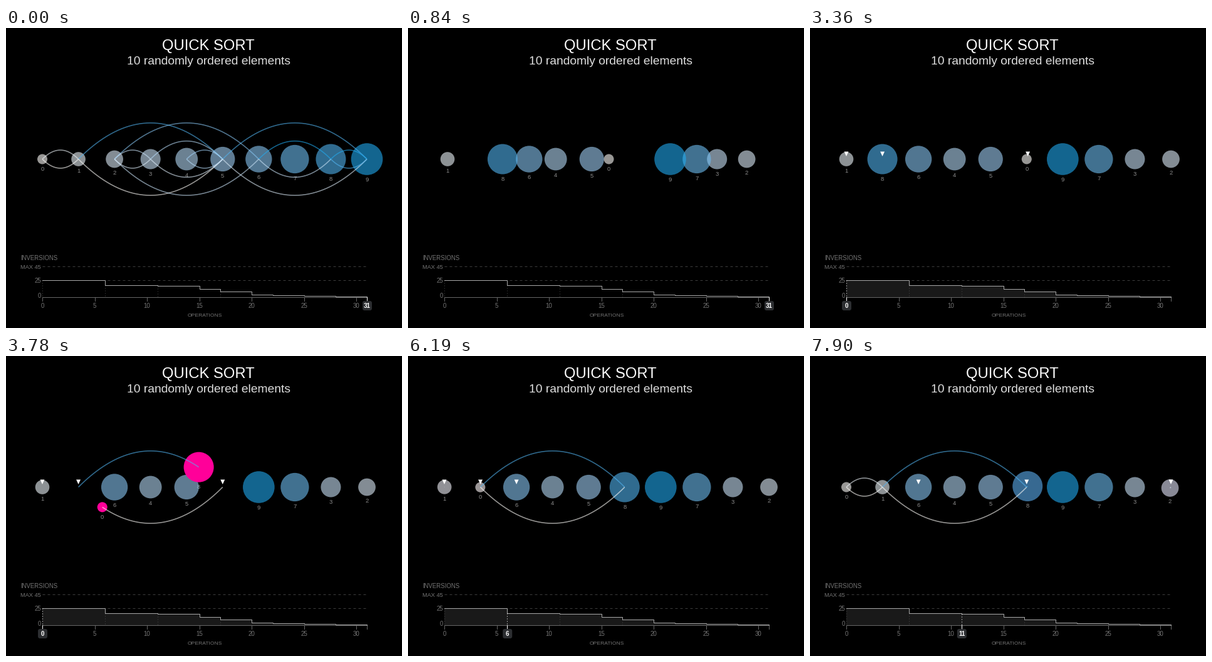
Animation, 632 px wide and 477 px high, one loop 8 s. Source, as a matplotlib script:

```python
import numpy as np
import matplotlib.pyplot as plt
from matplotlib.animation import FuncAnimation
from matplotlib.patches import Circle, FancyBboxPatch, Polygon

W, H, LOOP, TICK = 632, 477, 8000, 40
PX = 0.72                      # points per pixel at 100 dpi
X0, X1, MID = 58, 576, 208.5   # row of elements
BASE = 428.5                   # chart axis
SANS = "Liberation Sans"

START = [1, 8, 6, 4, 5, 0, 9, 7, 3, 2]
SWAPS = [(1, 5), (0, 1), (5, 9), (6, 8), (2, 6), (3, 5), (2, 3), (4, 5), (8, 9)]
SWAP_OPS = [6, 11, 15, 17, 20, 22, 25, 28, 31]
SWAP_TIMES = [3453, 5994, 7842]
SWAP_MS, TINT_MS = 500, 250
SHUFFLE, READY = 480, 965

# picture refresh moments: anchors and the number of steps between them
ANCHORS = [0, 560, 840, 990, 1410, 1530, 1650, 2670, 2790, 3360, 3510, 3780,
           3930, 4510, 4630, 4870, 5010, 6040, 6190, 7120, 7270, 7900]
COUNTS = [1, 2, 1, 3, 1, 1, 7, 1, 4, 1, 2, 1, 4, 1, 2, 1, 8, 1, 7, 1, 5]
STEPS = np.concatenate(
    [np.linspace(a, b, n, endpoint=False)
     for a, b, n in zip(ANCHORS, ANCHORS[1:], COUNTS)] + [[ANCHORS[-1]]])


def cubic(t):
    t = min(max(t, 0), 1)
    return 4 * t ** 3 if t < 0.5 else 1 - 4 * (1 - t) ** 3


def back(t, s=1.05):
    u = min(max(t, 0), 1) - 1
    return 1 + (s + 1) * u ** 3 + s * u ** 2


def slot(i):
    return X0 + (X1 - X0) * i / 9


def op_x(op):
    return X0 + (X1 - X0) * op / 31


def inv_y(n):
    return BASE - 1.1 * n


def radius(v):
    return 8 * np.sqrt(1 + v)


def shade(v):
    return np.array([33 + 222 * (1 - v / 9) ** 0.7, 253 - 9.2 * v,
                     250 - 1.2 * v, 153]) / 255


PINK = np.array([1, 0, 0.6, 1])


def inversions(row):
    return sum(a > b for i, a in enumerate(row) for b in row[i + 1:])


# the whole sort: values moved by each swap and inversions left after it
row, movers, levels = START[:], [], [inversions(START)]
for a, b in SWAPS:
    movers.append((row[a], row[b]))
    row[a], row[b] = row[b], row[a]
    levels.append(inversions(row))

# pointer moves: (start, duration, slot, ease)
POINTERS = [
    (8, [(READY, 440, 0, back), (6494, 390, 2, cubic)]),
    (9, [(READY, 440, 1, back), (3953, 500, 2, cubic), (6494, 390, 3, cubic),
         (6886, 475, 4, cubic), (7361, 475, 5, cubic)]),
    (0, [(READY, 495, 9, cubic)]
     + [(1460 + 500 * k, 500, 8 - k, cubic) for k in range(4)]
     + [(3953, 500, 4, cubic)]
     + [(4453 + 513 * k, 513, 3 - k, cubic) for k in range(3)]
     + [(6930, 550, 9, back)]),
]

# the small extra keeps the pixel size from rounding down
fig = plt.figure(figsize=((W + 0.001) / 100, (H + 0.001) / 100), dpi=100,
                 facecolor="black")
ax = fig.add_axes([0, 0, 1, 1])
ax.set_xlim(0, W)
ax.set_ylim(H, 0)
ax.axis("off")


def text(x, y, s, size, color, ha="center", **kw):
    return ax.text(x, y, s, fontsize=size * PX, color=color, ha=ha,
                   va="baseline", family=SANS, **kw)


def line(x, y, color, width=1, **kw):
    return ax.plot(x, y, color=color, lw=width * PX, **kw)[0]


# titles
text(323, 35, "QUICK SORT", 23.8, "#ffffff")
text(323, 58, "10 randomly ordered elements", 19.3, "#dddddd")

# chart
GREY, DIM = "#747474", "#3c3c3c"
text(23, 369, "INVERSIONS", 9.6, GREY, "left")
text(56, 383, "MAX 45", 9.3, GREY, "right")
text(56, 405, "25", 9.6, GREY, "right")
text(56, 429, "0", 9.6, GREY, "right")
text(317, 459, "OPERATIONS", 8.5, GREY)
for n in (45, 25):
    line([X0, X1], [inv_y(n)] * 2, DIM, ls=(0, (4, 4)), zorder=2)
for op, n in ((0, 25), (6, 18), (11, 17), (17, 9)):
    line([op_x(op)] * 2, [inv_y(n), BASE], "#484848", ls=(0, (1, 3)), zorder=2)
line([X0, X1], [BASE, BASE], "#666666", zorder=2)
for op in list(range(0, 31, 5)) + [31]:
    line([op_x(op)] * 2, [BASE, 434.5], "#666666", zorder=2)
    if op < 31:
        text(op_x(op), 445, str(op), 9.8, GREY)

step_x, step_y = [X0], [inv_y(levels[0])]
for op, a, b in zip(SWAP_OPS, levels, levels[1:]):
    step_x += [op_x(op)] * 2
    step_y += [inv_y(a), inv_y(b)]
line(step_x, step_y, "#a8a8a8", zorder=3, solid_joinstyle="miter")
area = ax.add_patch(Polygon(list(zip(step_x + [X0], step_y + [BASE])),
                            fc="#191919", ec="none", zorder=1))

# current operation
mark = line([], [], "white", ls=(0, (1, 3)), zorder=4)
tick = line([], [], "white", zorder=4)
badge = ax.add_patch(FancyBboxPatch((0, 434), 15, 15, fc="#2c2e31", ec="none",
                                    boxstyle="round,pad=0,rounding_size=3",
                                    zorder=5))
count = text(0, 445.2, "", 9.8, "white", weight="bold", zorder=6)

# elements, swap trails and pointers
balls = [ax.add_patch(Circle((0, 0), radius(v), lw=0, zorder=7)) for v in range(10)]
tags = [text(0, 0, str(v), 9.5, "#8a8a8a", zorder=6) for v in range(10)]
trails = [[line([], [], shade(v), 1.6, zorder=8, solid_capstyle="butt")
           for v in pair] for pair in movers]
arrows = [ax.add_patch(Polygon([(0, 0)] * 3, fc="white", ec="none", zorder=9))
          for _ in POINTERS]


def arc(a, b, s, side):
    """Point(s) on the path from slot a to slot b, bulging up (-1) or down (1)."""
    xa, xb = slot(a), slot(b)
    return xa + (xb - xa) * s, MID + side * abs(xb - xa) * s * (1 - s)


def trail(k, s):
    a, b = SWAPS[k]
    part = np.linspace(0, s, 41)
    trails[k][0].set_data(*arc(a, b, part, -1))
    trails[k][1].set_data(*arc(b, a, part, 1))


def show_op(op):
    x = op_x(op)
    left = levels[sum(o <= op for o in SWAP_OPS)]
    mark.set_data([x, x], [inv_y(left), BASE])
    tick.set_data([x, x], [BASE, 434.5])
    badge.set_x(x - 7)
    count.set_text(str(op))
    count.set_x(x + 0.4)


def draw(frame):
    now = frame * TICK + TICK / 2
    t = STEPS[np.searchsorted(STEPS, now, side="right") - 1]
    finished = t < SHUFFLE
    mix = cubic((t - SHUFFLE) / 500)
    pos = {v: (slot(v) + (slot(i) - slot(v)) * mix, MID)
           for i, v in enumerate(START)}
    tint = dict.fromkeys(range(10), 0)
    op = 31 if t < READY else 0

    for k, (a, b) in enumerate(SWAPS):
        begin = SWAP_TIMES[k] if k < len(SWAP_TIMES) else LOOP
        if finished:
            trail(k, 1)
        elif t < begin:
            for piece in trails[k]:
                piece.set_data([], [])
        else:
            s = cubic((t - begin) / SWAP_MS)
            trail(k, s)
            lo, hi = movers[k]
            pos[lo], pos[hi] = arc(a, b, s, -1), arc(b, a, s, 1)
            glow = (cubic((t - begin) / TINT_MS)
                    - cubic((t - begin - SWAP_MS) / TINT_MS))
            for v in (lo, hi):
                tint[v] = max(tint[v], glow)
            if t >= begin + SWAP_MS:
                op = SWAP_OPS[k]

    for v in range(10):
        x, y = pos[v]
        balls[v].center = x, y
        balls[v].set_facecolor(shade(v) + (PINK - shade(v)) * tint[v])
        tags[v].set_position((x, y + radius(v) + 10.4))

    for shape, (home, moves) in zip(arrows, POINTERS):
        x = slot(home)
        for begin, ms, to, ease in moves:
            if t >= begin:
                x += (slot(to) - x) * ease((t - begin) / ms)
        shape.set_xy([(x - 3.5, 196.5), (x + 3.5, 196.5), (x, 204)])
        shape.set_visible(t >= READY)

    area.set_visible(t >= READY)
    show_op(op)
    return []


anim = FuncAnimation(fig, draw, frames=LOOP // TICK, interval=TICK,
                     repeat=True, repeat_delay=0, init_func=lambda: draw(0))
plt.show()
```
